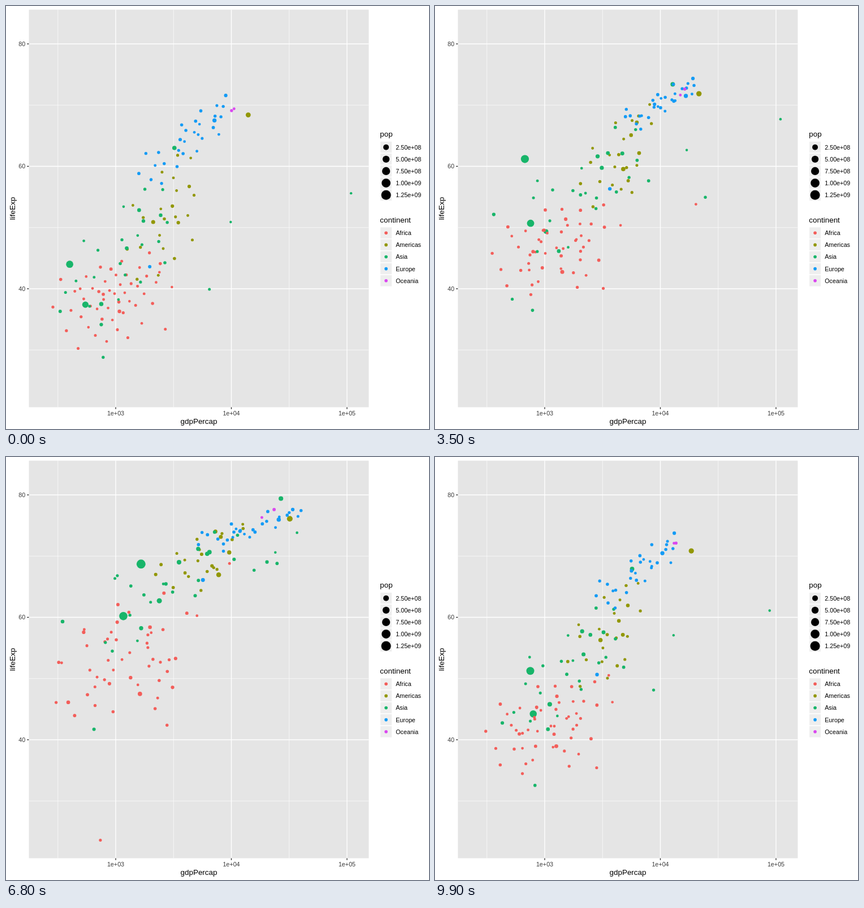
An HTML page that plays this animation: 748x748 px, repeating every 10 s.

```html
<!DOCTYPE html>
<html lang="en">
<head>
<meta charset="utf-8">
<title>lifeExp by gdpPercap</title>
<style>
html, body { margin: 0; width: 100%; height: 100%; overflow: hidden; background: #fff; }
svg { display: block; width: 100vw; height: 100vh; }
text { font-family: "Liberation Sans", Arial, sans-serif; font-size: 10.75px; }
.title { font-size: 13.44px; }
.axis { fill: #3a3a3a; }
</style>
</head>
<body>
<svg id="plot" viewBox="0 0 748 748"></svg>
<script>
const svg = document.getElementById('plot');
const LOOP = 10000, STEP = 100, STATES = 12;
const COLOURS = {
  Africa: '#f35e5a', Americas: '#929705', Asia: '#18b56a', Europe: '#149bf5', Oceania: '#da47ef'
};
const dots = [];

const lerp = (a, b, k) => a + (b - a) * k;
const xOf = logGdp => 194 + 204.5 * (logGdp - 3);
const yOf = life => 67 + (80 - life) * 10.825;
const radius = size => 0.863 + 1.304 * size;
const sizeOf = pop => 1 + 5 * Math.sqrt(Math.max(0, pop - 0.06) / 1318.6);

function el(name, attrs, text) {
  const node = document.createElementNS('http://www.w3.org/2000/svg', name);
  for (const key in attrs) node.setAttribute(key, attrs[key]);
  if (text) node.textContent = text;
  return svg.appendChild(node);
}
const line = (x1, y1, x2, y2, stroke, w) => el('line', { x1, y1, x2, y2, stroke, 'stroke-width': w });
const rect = (x, y, width, height, fill, more) => el('rect', { x, y, width, height, fill, ...more });
const circle = (cx, cy, r, fill) => el('circle', { cx, cy, r, fill });

function drawPanel() {
  rect(0, 0, 748, 748, '#fff');
  rect(40.5, 6.5, 601, 703, '#e5e5e5');
  for (const life of [70, 50, 30]) line(40.5, yOf(life), 641.5, yOf(life), '#fff', 0.65);
  for (const p of [2.5, 3.5, 4.5]) line(xOf(p), 6.5, xOf(p), 709.5, '#fff', 0.65);
  for (const life of [80, 60, 40]) {
    const y = yOf(life);
    line(40.5, y, 641.5, y, '#fff', 1.3);
    line(37.2, y, 40.5, y, '#232323', 1.3);
    el('text', { x: 34.3, y: y + 3.9, 'text-anchor': 'end', class: 'axis' }, String(life));
  }
  for (const p of [3, 4, 5]) {
    const x = xOf(p);
    line(x, 6.5, x, 709.5, '#fff', 1.3);
    line(x, 709.5, x, 712.8, '#232323', 1.3);
    el('text', { x, y: 723.6, 'text-anchor': 'middle', class: 'axis' }, '1e+0' + p);
  }
  el('text', { x: 341, y: 738.8, 'text-anchor': 'middle', class: 'title' }, 'gdpPercap');
  el('text', { transform: 'translate(16.3 358) rotate(-90)', 'text-anchor': 'middle', class: 'title' }, 'lifeExp');
}

function drawLegend(title, y, labels, dot) {
  el('text', { x: 661.3, y, class: 'title' }, title);
  labels.forEach((label, i) => {
    const cy = y + 18.7 + 21.12 * i;
    rect(661.5, cy - 10.56, 21.12, 21.12, '#eee', { stroke: '#fff', 'stroke-width': 1.3 });
    circle(672.1, cy, ...dot(i, label));
    el('text', { x: 689.2, y: cy + 3.9 }, label);
  });
}

// Reads straight lines through key points [state, ...values].
function between(keys, state) {
  const n = Math.max(1, keys.findIndex(key => key[0] >= state));
  const [a, b] = [keys[n - 1], keys[n]];
  const k = (state - a[0]) / (b[0] - a[0]);
  return a.slice(1).map((v, i) => lerp(v, b[i + 1], k));
}

// Adds a dot; place(state) gives [log gdp, life], pops are in millions.
function addDot(continent, pop0, pop1, place) {
  const path = Array.from({ length: STATES }, (_, state) => {
    const [logGdp, life] = place(state);
    const pop = pop0 * (pop1 / pop0) ** (state / (STATES - 1));
    return { x: xOf(logGdp), y: yOf(life), size: sizeOf(pop) };
  });
  dots.push({ path, node: circle(0, 0, 0, COLOURS[continent]) });
}

// A country that stands out, by key points [state, gdp, life].
function landmark(continent, pop0, pop1, ...points) {
  const keys = points.map(([state, gdp, life]) => [state, Math.log10(gdp), life]);
  addDot(continent, pop0, pop1, state => between(keys, state));
}

let seed = 7;
function random() {
  seed = (seed * 16807) % 2147483647;
  return seed / 2147483647;
}
// Bell-shaped spread of p in 0..1, about -1.9 to 1.9.
function bell(p) {
  const q = 0.03 + 0.94 * p;
  return Math.log(q / (1 - q)) / 1.8;
}

// The other countries of a continent, evenly scattered and slowly wandering round its trend.
// Each trend key is [state, mean log gdp, its spread, mean life, its spread].
function crowd(continent, count, pop0, pop1, bond, ...trend) {
  for (let i = 0; i < count; i++) {
    const u = [bell((0.5 + i * 0.7549) % 1), bell(random())];
    const v = [bell((0.5 + i * 0.5698) % 1), bell(random())];
    const scale = Math.exp(1.1 * bell(random()));
    addDot(continent, pop0 * scale, pop1 * scale, state => {
      const [gdp, gdpSpread, life, lifeSpread] = between(trend, state);
      const turn = state * 0.07;
      const wander = ([a, b]) => a * Math.cos(turn) + b * Math.sin(turn);
      const zx = wander(u), zy = bond * zx + Math.sqrt(1 - bond * bond) * wander(v);
      // Life expectancy flattens towards a ceiling that rises with time.
      const room = 73.5 + 0.8 * state - (life + lifeSpread * zy);
      return [gdp + gdpSpread * zx, 73.5 + 0.8 * state - 2 * Math.log(1 + Math.exp(room / 2))];
    });
  }
}

drawPanel();
drawLegend('pop', 231, ['2.50e+08', '5.00e+08', '7.50e+08', '1.00e+09', '1.25e+09'],
  (i, label) => [radius(sizeOf(label / 1e6)), '#000']);
drawLegend('continent', 382.6, Object.keys(COLOURS), (i, label) => [radius(1.5), COLOURS[label]]);

landmark('Asia', 556, 1319, [0, 400, 44], [1, 576, 50.5], [2, 488, 44.5], [3, 613, 58.4], [5, 741, 64], [8, 1656, 68.7], [11, 4959, 73]);
landmark('Asia', 372, 1110, [0, 547, 37.4], [3, 701, 47.2], [5, 813, 54.2], [8, 1164, 60.2], [11, 2452, 64.7]);
landmark('Asia', 86, 127, [0, 3217, 63], [3, 9848, 71.4], [5, 16610, 75.4], [8, 26825, 79.4], [11, 31656, 82.6]);
landmark('Asia', 82, 224, [0, 750, 37.5], [3, 762, 46], [5, 1383, 52.7], [8, 2383, 62.7], [11, 3541, 70.7]);
landmark('Asia', 0.2, 2.5, [0, 108382, 55.6], [2, 95458, 60.5], [4, 109348, 67.7], [6, 31354, 71.3], [11, 47307, 77.6]);
landmark('Asia', 4.7, 14, [0, 368, 39.4], [3, 523, 45.4], [5, 525, 31.2], [6, 624, 51], [11, 1714, 59.7]);
landmark('Asia', 4, 28, [0, 6460, 39.9], [5, 34168, 58.7], [8, 24842, 68.8], [11, 21655, 72.8]);
landmark('Asia', 0.1, 0.7, [0, 9867, 50.9], [5, 19340, 65.6], [11, 29796, 75.6]);
landmark('Asia', 8.4, 32, [0, 779, 28.8], [5, 786, 38.4], [8, 649, 41.7], [11, 975, 43.8]);
landmark('Asia', 20, 48, [0, 331, 36.3], [5, 371, 56.1], [8, 347, 59.3], [11, 944, 62.1]);
landmark('Americas', 158, 301, [0, 13990, 68.4], [3, 19530, 70.8], [8, 32004, 76.1], [11, 42952, 78.2]);
landmark('Americas', 57, 190, [0, 2109, 50.9], [3, 3430, 57.6], [5, 6660, 61.5], [11, 9066, 72.4]);
landmark('Americas', 30, 109, [0, 3478, 50.8], [5, 7675, 65], [11, 11978, 76.2]);
landmark('Africa', 33, 135, [0, 1077, 36.3], [3, 1015, 41], [5, 1982, 44.5], [8, 1620, 47.5], [11, 2014, 46.9]);
landmark('Africa', 2.5, 8.9, [0, 493, 40], [6, 882, 46.2], [8, 737, 23.6], [9, 590, 36.1], [11, 863, 46.2]);
landmark('Africa', 14, 65, [0, 781, 39.1], [5, 796, 47.8], [10, 241, 45], [11, 278, 46.5]);
landmark('Africa', 1, 6, [0, 2388, 42.7], [3, 18773, 50.2], [5, 21951, 57.4], [8, 9640, 68.8], [11, 12057, 74]);
landmark('Europe', 22, 71, [0, 1969, 43.6], [5, 4269, 59.5], [8, 5678, 66.1], [11, 8458, 71.8]);
landmark('Europe', 69, 82, [0, 7144, 67.5], [5, 20513, 72.5], [11, 32170, 79.4]);

crowd('Africa', 48, 3.2, 10, 0.4,
  [0, 2.99, 0.3, 39.2, 5], [5, 3.15, 0.32, 49.6, 5.6], [8, 3.12, 0.36, 54, 8], [11, 3.25, 0.43, 55, 9.3]);
crowd('Americas', 22, 3.5, 10, 0.6,
  [0, 3.49, 0.22, 53.5, 8.5], [5, 3.74, 0.2, 64.8, 6.5], [8, 3.78, 0.24, 70, 4.5], [11, 3.92, 0.25, 73.8, 3.8]);
crowd('Asia', 23, 6, 20, 0.65,
  [0, 3.19, 0.3, 48.7, 8], [5, 3.58, 0.38, 61.5, 7], [8, 3.68, 0.48, 67.8, 6], [11, 3.85, 0.43, 72, 5.5]);
crowd('Europe', 28, 7, 9, 0.85,
  [0, 3.68, 0.27, 65.6, 5], [5, 4.12, 0.2, 72.4, 2.5], [8, 4.16, 0.3, 75, 2.8], [11, 4.37, 0.21, 78.2, 2.8]);

landmark('Oceania', 8.7, 20, [0, 10040, 69.1], [5, 18334, 73.5], [8, 23425, 77.6], [11, 34435, 81.2]);
landmark('Oceania', 2, 4.1, [0, 10557, 69.4], [5, 16234, 72.2], [8, 18363, 76.3], [11, 25185, 80.2]);

// Each state rests, then moves straight to the next over the last 400 ms.
const arrival = i => Math.min(900 * i - 100, 800 * i + 400);

function draw(time) {
  const t = Math.floor((time % LOOP) / STEP) * STEP;
  let next = 1;
  while (arrival(next) <= t) next++;
  const k = Math.max(0, 1 - (arrival(next) - t) / 400);
  for (const { path, node } of dots) {
    const a = path[next - 1], b = path[next % STATES];
    node.setAttribute('cx', lerp(a.x, b.x, k).toFixed(2));
    node.setAttribute('cy', lerp(a.y, b.y, k).toFixed(2));
    node.setAttribute('r', radius(lerp(a.size, b.size, k)).toFixed(2));
  }
}

function tick() {
  draw(performance.now());
  requestAnimationFrame(tick);
}
tick();
</script>
</body>
</html>
```
